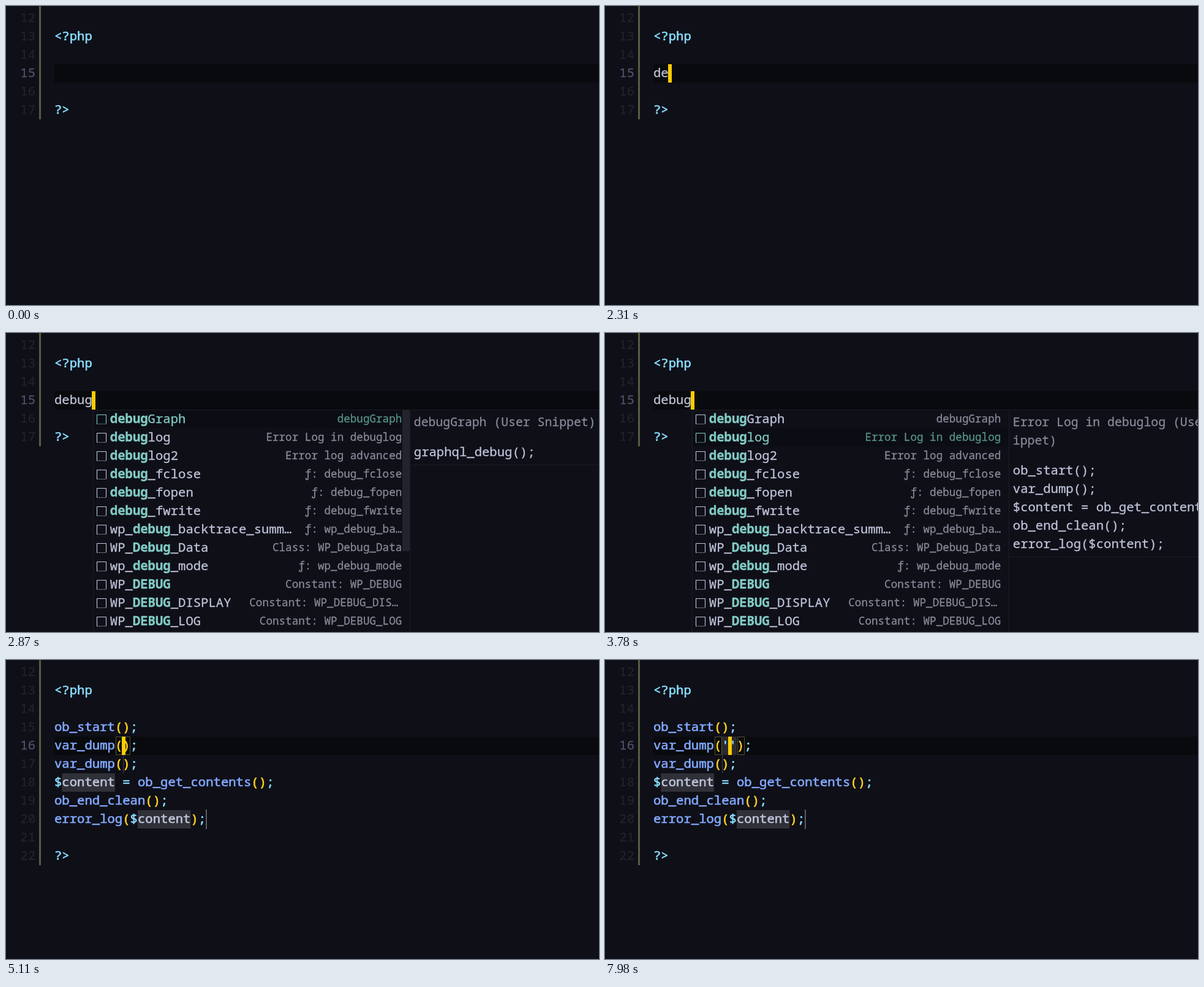
Recreate the animation shown at these times as an HTML page with a canvas. Size 968 by 488 pixels, loop 8000 ms.

```html
<!DOCTYPE html>
<html lang="en">
<head>
<meta charset="utf-8">
<title>Snippet completion</title>
<style>
html, body { margin: 0; width: 100%; height: 100%; overflow: hidden; background: #0f0f18; }
canvas { display: block; }
</style>
</head>
<body>
<canvas id="stage" width="968" height="488"></canvas>
<script>
const ctx = document.getElementById('stage').getContext('2d');
const W = 968, H = 488, LOOP = 8000;
const ROW = 30, BASE = 21, LEFT = 79, ADV = 12.36;
const MONO = '"Noto Sans Mono", "DejaVu Sans Mono", monospace';
const SIZE = ADV / 0.6, DETAIL = 17.62, TITLE = 19.8;
const LIGHT = 0.3, MEDIUM = 0.65; // outline that thickens the letters

const C = {
  bg: '#0f0f18', line: '#090a0d', selected: '#0c0d14', number: '#23232d', active: '#50536a',
  gutter: '#545f42', plain: '#bfc5da', punct: '#89ddff', func: '#82aaff',
  paren: '#ffd21c', cursor: '#ffcc00', teal: '#80cbc4', dimTeal: '#569389',
  gray: '#888a98', border: '#1b1c26', slider: '#22232c', word: '#2f3038',
  match: '#56512f', string: '#2a2a30', stop: '#30323a', finalStop: '#5b5d64'
};

// label, detail, inset of the detail from the right
const ITEMS = [
  ['debugGraph', 'debugGraph'],
  ['debuglog', 'Error Log in debuglog'],
  ['debuglog2', 'Error log advanced'],
  ['debug_fclose', 'ƒ: debug_fclose'],
  ['debug_fopen', 'ƒ: debug_fopen'],
  ['debug_fwrite', 'ƒ: debug_fwrite'],
  ['delete_blog_option', 'ƒ: delete_blog_opti…', 9],
  ['dead_db', 'ƒ: dead_db'],
  ['delete_metadata_by_m…', 'ƒ: delete_metada…', 9],
  ['wp_debug_backtrace_summ…', 'ƒ: wp_debug_ba…'],
  ['WP_Debug_Data', 'Class: WP_Debug_Data'],
  ['wp_debug_mode', 'ƒ: wp_debug_mode'],
  ['WP_DEBUG', 'Constant: WP_DEBUG'],
  ['WP_DEBUG_DISPLAY', 'Constant: WP_DEBUG_DIS…', 6],
  ['WP_DEBUG_LOG', 'Constant: WP_DEBUG_LOG']
];

const LOG_TAIL = ['$content = ob_get_contents();', 'ob_end_clean();', 'error_log($content);'];
const SNIPPET = ['ob_start();', 'var_dump();', 'var_dump();', ...LOG_TAIL];
const DOCS = [
  { title: ['debugGraph (User Snippet)'], body: ['graphql_debug();'] },
  { title: ['Error Log in debuglog (User Sn', 'ippet)'], body: ['ob_start();', 'var_dump();', ...LOG_TAIL] },
  { title: ['Error log advanced (User Snipp', 'et)'], body: SNIPPET }
];

const TYPING = [[0, ''], [2310, 'de'], [2450, 'deb'], [2660, 'debu'], [2870, 'debug']];
const MENU_AT = 2520, DOC_AT = 2590, CURSOR_AT = 910;
const SELECT_AT = [3640, 3990], ACCEPT_AT = 4550, QUOTE_AT = 7070;

const colX = n => LEFT + n * ADV;
const rowTop = n => 5 + (n - 12) * ROW;

function rect(color, x, y, w, h) {
  ctx.fillStyle = color;
  ctx.fillRect(x, y, w, h);
}

function text(str, x, y, color, { size = SIZE, weight = 400, align = 'left', outline = LIGHT } = {}) {
  ctx.font = `${weight} ${size}px ${MONO}`;
  ctx.textAlign = align;
  ctx.fillStyle = ctx.strokeStyle = color;
  ctx.lineWidth = outline;
  ctx.lineJoin = 'round';
  ctx.fillText(str, x, y);
  ctx.strokeText(str, x, y);
}

function box(color, x, y, w, h) {
  ctx.strokeStyle = color;
  ctx.lineWidth = 1;
  ctx.strokeRect(Math.round(x) + 0.5, y + 0.5, Math.round(w), h);
}

function frame(lastLine, active) {
  rect(C.bg, 0, 0, W, H);
  rect(C.line, LEFT, rowTop(active), W - LEFT, ROW);
  rect(C.gutter, 54, 0, 3, rowTop(lastLine + 1));
  for (let n = 12; n <= lastLine; n++) {
    text(n, 23.3, rowTop(n) + BASE, n === active ? C.active : C.number);
  }
  codeLine('<?php', 13);
  codeLine('?>', lastLine);
}

function tokenColor(token, next) {
  if (/^[()]/.test(token)) return C.paren;
  if (token === 'content') return C.plain;
  if (/^\w/.test(token) && next === '(') return C.func;
  return C.punct;
}

function codeLine(str, n) {
  for (const m of str.matchAll(/<\?php|\w+|[^\w\s]/g)) {
    const token = m[0], x = colX(m.index), next = str[m.index + token.length];
    if (token === 'content') rect(C.word, x, rowTop(n), token.length * ADV, ROW);
    text(token, x, rowTop(n) + BASE, tokenColor(token, next), { outline: MEDIUM });
  }
}

function cursor(col, n) {
  rect(C.cursor, Math.floor(colX(col) - 0.7), rowTop(n), 6, ROW);
}

// Indices of the typed letters inside a label, or null
function fuzzy(typed, label) {
  const low = label.toLowerCase(), hits = [];
  let at = -1;
  for (const ch of typed) {
    at = low.indexOf(ch, at + 1);
    if (at < 0) return null;
    hits.push(at);
  }
  return hits;
}

function icon(x, y, color) {
  ctx.strokeStyle = color;
  ctx.lineWidth = 1.1;
  ctx.beginPath();
  ctx.moveTo(x, y + 15);
  ctx.lineTo(x, y);
  ctx.lineTo(x + 15, y);
  ctx.lineTo(x + 15, y + 15);
  ctx.stroke();
  ctx.setLineDash([1.5, 1.5]);
  ctx.beginPath();
  ctx.moveTo(x, y + 15);
  ctx.lineTo(x + 15, y + 15);
  ctx.stroke();
  ctx.setLineDash([]);
}

function menu(typed, selected, sliderAlpha) {
  const x = colX(typed.length), left = Math.round(x + 1), top = 125;
  rect(C.bg, left, top, 517, H - top);
  const rows = ITEMS.filter(item => fuzzy(typed, item[0])).slice(0, 12);
  rows.forEach(([label, detail, inset = 0], i) => {
    const y = top + i * ROW, on = i === selected;
    if (on) rect(C.selected, left, y, 517, ROW);
    icon(Math.round(x + 7) + 0.5, y + 8.5, on ? C.teal : C.plain);
    const hits = fuzzy(typed, label);
    [...label].forEach((ch, k) => {
      const hit = hits.includes(k);
      text(ch, x + 29 + k * ADV, y + 22, hit || on ? C.teal : C.plain, { weight: hit ? 700 : 400 });
    });
    text(detail, x + 505.5 - inset, y + 21, on ? C.dimTeal : C.gray, { size: DETAIL, align: 'right' });
  });
  ctx.globalAlpha = sliderAlpha;
  rect(C.slider, Math.round(x + 506), top, 12, typed.length < 4 ? 43 : 231);
  ctx.globalAlpha = 1;
  box(C.border, left, top, 517, H);
}

function docs(typed, { title, body }) {
  const x = colX(typed.length), left = Math.round(x + 518);
  const bodyTop = 201 + (title.length - 1) * ROW;
  const height = 90 + (title.length + body.length - 2) * ROW;
  rect(C.bg, left, 125, W, height);
  title.forEach((s, i) => text(s, x + 525, 152 + i * ROW, C.gray, { size: TITLE }));
  body.forEach((s, i) => text(s, x + 525, bodyTop + i * ROW, C.plain));
  box(C.border, left, 125, W, height);
}

function typingScene(t) {
  const typed = TYPING.filter(step => t >= step[0]).pop()[1];
  frame(17, 15);
  text(typed, LEFT, rowTop(15) + BASE, C.plain);
  if (t >= CURSOR_AT) cursor(typed.length, 15);
  if (t < MENU_AT) return;
  const selected = SELECT_AT.filter(s => t >= s).length;
  menu(typed, selected, Math.min(1, Math.max(0, (3640 - t) / 210)));
  if (t >= DOC_AT) docs(typed, DOCS[selected]);
}

function snippetScene(t) {
  const quoted = t >= QUOTE_AT, y = rowTop(16);
  frame(22, 16);
  const close = quoted ? 11 : 9;
  if (quoted) rect(C.string, colX(9), y, 2 * ADV, ROW);
  SNIPPET.forEach((s, i) => codeLine(i === 1 && quoted ? "var_dump('');" : s, 15 + i));
  for (const col of [8, close]) box(C.match, colX(col) + 0.8, y, ADV - 1, ROW - 1);
  rect(C.stop, 191, rowTop(17), 1.5, ROW);
  rect(C.finalStop, 326, rowTop(20) - 1, 2, ROW + 2);
  cursor(quoted ? 10 : 9, 16);
}

function tick(now) {
  const t = now % LOOP;
  (t < ACCEPT_AT ? typingScene : snippetScene)(t);
  requestAnimationFrame(tick);
}
requestAnimationFrame(tick);
</script>
</body>
</html>
```
